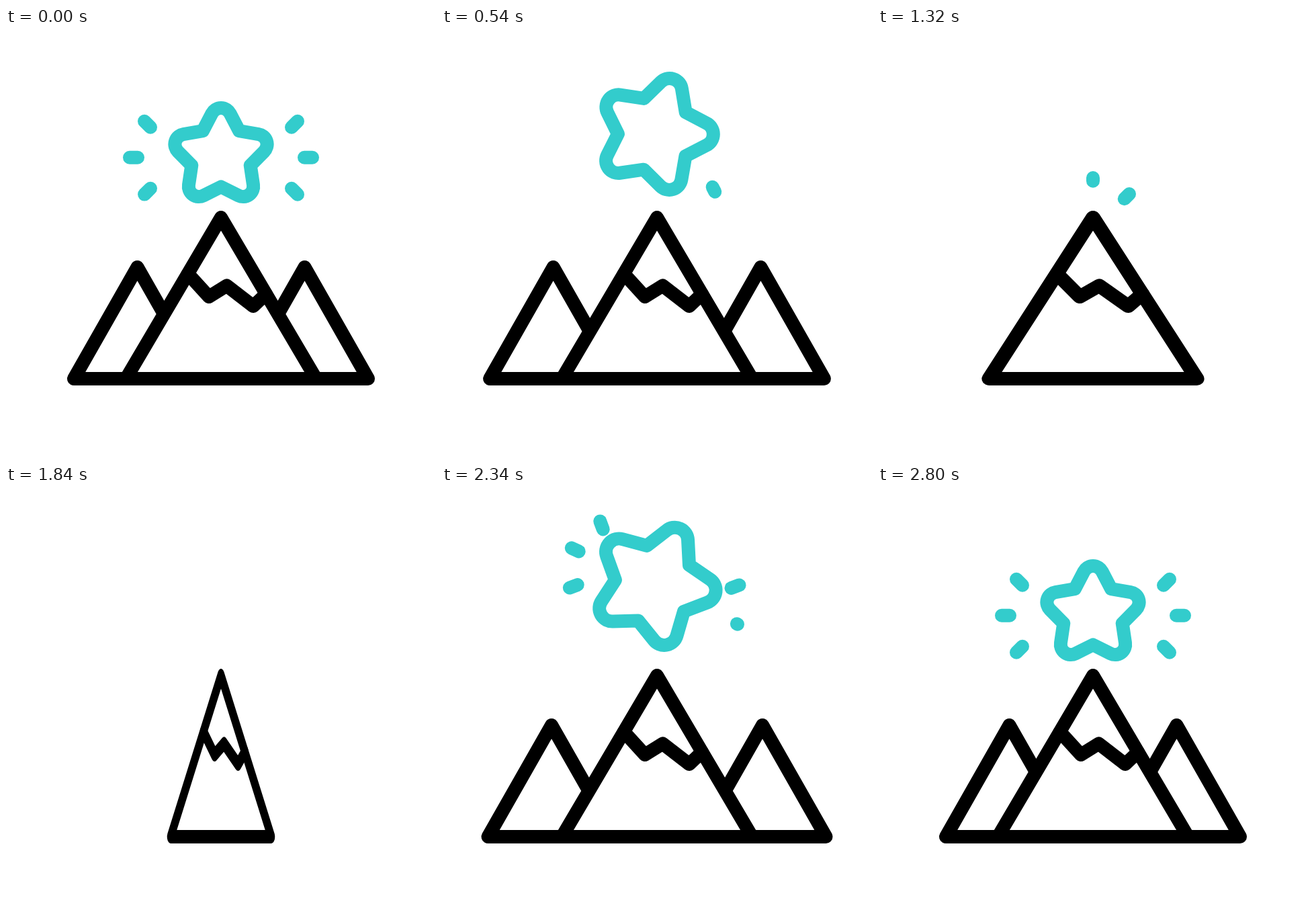
An HTML page with a canvas for the animation above (3020 ms loop, 640 by 640 pixels).

```html
<!DOCTYPE html>
<html lang="en">
<head>
<meta charset="utf-8">
<title>Star over the mountains</title>
<style>
  html, body { margin: 0; width: 100%; height: 100%; overflow: hidden; background: #fff; }
  canvas { display: block; width: 640px; height: 640px; }
</style>
</head>
<body>
<canvas id="stage" width="640" height="640"></canvas>
<script>
const ctx = document.getElementById('stage').getContext('2d');
const LOOP = 3020;
const TEAL = '#33cccc';
const BLACK = '#000';
const RAD = Math.PI / 180;

const clamp = v => Math.min(1, Math.max(0, v));
const progress = (t, from, to) => clamp((t - from) / (to - from));
const smooth = p => p * p * (3 - 2 * p);
const backIn = p => p * p * (2.70158 * p - 1.70158);
const mix = (a, b, k) => a + (b - a) * k;

// Star poses
const REST = { y: 190.4, rot: 0, scale: 1 };
const LEAP = { y: 150.8, rot: 20.9, scale: 1.238 };
const DIVE = { y: 318, rot: -42.5, scale: 0.555 };
const BURIED = { y: 389, rot: -77, scale: 0.396 };
const RISEN = { y: 143.5, rot: 26, scale: 1.295 };

const blend = (a, b, k) => ({
  y: mix(a.y, b.y, k),
  rot: mix(a.rot, b.rot, k),
  scale: mix(a.scale, b.scale, k)
});

function starPose(t) {
  if (t < 421) return blend(REST, LEAP, smooth(t / 421));
  if (t < 1000) return blend(LEAP, DIVE, ((t - 421) / 459) ** 2.36);
  if (t < 1860) return null;
  if (t < 2490) return blend(RISEN, BURIED, (1 - progress(t, 1860, 2490)) ** 3);
  return blend(RISEN, REST, smooth(progress(t, 2490, 2800)));
}

// Horizontal shift of the side peaks towards the middle
function sideShift(t) {
  if (t < 430) return -32 * smooth(t / 430);
  if (t < 1210) return -32 + 46 * ((t - 430) / 450) ** 2.2;
  if (t < 1900) return null;
  if (t < 2390) return -32.5 + 157 * (1 - progress(t, 1900, 2390)) ** 3.85;
  return -32.5 * (1 - smooth(progress(t, 2390, 2800)));
}

function peakWidth(t) {
  if (t < 1560) return 1 - backIn(progress(t, 1100, 1560));
  if (t < 1800) return 0;
  return 1 - backIn(1 - progress(t, 1800, 2100));
}

function polyline(points, color, closed) {
  ctx.beginPath();
  points.forEach(([x, y]) => ctx.lineTo(x, y));
  if (closed) {
    ctx.closePath();
    ctx.fillStyle = '#fff';
    ctx.fill();
  }
  ctx.strokeStyle = color;
  ctx.stroke();
}

// Draws the part of a segment between the fractions from and to
function dash(x1, y1, x2, y2, from, to) {
  if (to <= from) return;
  polyline([
    [mix(x1, x2, from), mix(y1, y2, from)],
    [mix(x1, x2, to), mix(y1, y2, to)]
  ], TEAL);
}

function drawStar({ y, rot, scale }) {
  const polar = (r, deg) => [r * scale * Math.sin(deg * RAD), -r * scale * Math.cos(deg * RAD)];
  ctx.save();
  ctx.translate(320 - 6.5 * scale * Math.sin(rot * RAD), y);
  ctx.rotate(rot * RAD);
  ctx.beginPath();
  ctx.moveTo(...polar(46, -36));
  for (let deg = 0; deg < 360; deg += 72) {
    const notch = polar(46, deg + 36);
    ctx.arcTo(...polar(89, deg), ...notch, 15.2 * scale);
    ctx.lineTo(...notch);
  }
  ctx.closePath();
  ctx.strokeStyle = TEAL;
  ctx.stroke();
  ctx.restore();
}

// Six rays, clockwise from the lower left; inner end first
const RAYS = [
  [-105, 46, -114, 55], [-124, 0, -136, 0], [-105, -45, -114, -54],
  [105, -45, 114, -54], [124, 0, 136, 0], [105, 46, 114, 55]
];

function drawRays(t, { y, rot }) {
  ctx.save();
  ctx.translate(320 - 8.7 * Math.sin(rot * RAD), y + 2.3);
  ctx.rotate(rot * RAD);
  RAYS.forEach((ray, i) => {
    if (t < 1000) dash(...ray, 0, 1 - progress(t, i * 100, i * 100 + 110));
    else dash(...ray, 1 - progress(t, 1930 + i * 100, 2040 + i * 100), 1);
  });
  ctx.restore();
}

// Sparks thrown off the summit as the star drops behind it
const SPARKS = [[274, 255, 266, 247], [320, 235, 320, 223], [366, 255, 374, 247]];

function drawSparks(t) {
  SPARKS.forEach((spark, i) => {
    const start = 870 + i * 95;
    if (t < start) return;
    const head = progress(t, start, start + 200);
    const tail = progress(t, start + 200, start + 400) ** 2;
    dash(...spark, tail, head);
  });
}

function drawSides(shift) {
  for (const side of [-1, 1]) {
    const x = 320 + side * (124.5 - shift);
    polyline([[x, 356], [x - 94.5, 522], [x + 94.5, 522]], BLACK, true);
  }
}

function drawPeak(width) {
  if (width <= 0) return;
  ctx.save();
  ctx.translate(320, 0);
  ctx.scale(width, 1);
  polyline([[0, 282], [-141.5, 522], [141.5, 522]], BLACK, true);
  polyline([[-49, 366], [-18, 400], [8.5, 383.5], [48, 414], [67, 396]], BLACK);
  ctx.restore();
}

function draw(t) {
  ctx.fillStyle = '#fff';
  ctx.fillRect(0, 0, 640, 640);
  ctx.lineWidth = 20;
  ctx.lineCap = ctx.lineJoin = 'round';
  const pose = starPose(t);
  if (pose && pose.scale > 0.05) {
    drawStar(pose);
    drawRays(t, pose);
  }
  drawSparks(t);
  const shift = sideShift(t);
  if (shift !== null) drawSides(shift);
  drawPeak(peakWidth(t));
}

function tick() {
  draw(performance.now() % LOOP);
  requestAnimationFrame(tick);
}
tick();
</script>
</body>
</html>
```
